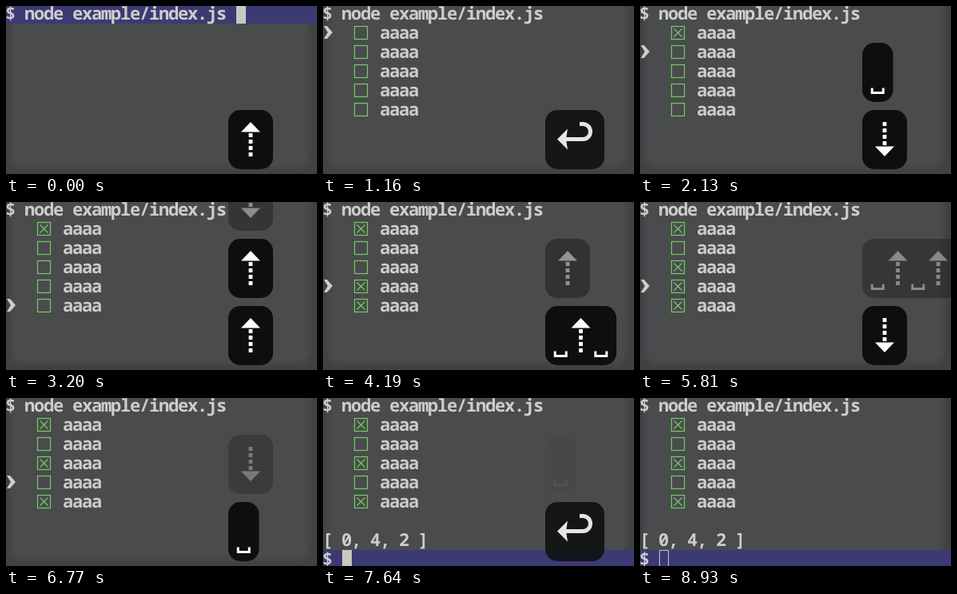
An HTML page for the animation above (9.03 s loop, 389x210 px).

```html
<!DOCTYPE html>
<html lang="en">
<head>
<meta charset="utf-8">
<title>Terminal checkbox list</title>
<style>
html, body { margin: 0; width: 100%; height: 100%; overflow: hidden; background: #404143; }
svg { display: block; width: 389px; height: 210px; }
text {
  font: 700 22px "Noto Sans Mono", "DejaVu Sans Mono", monospace;
  letter-spacing: -1.2px; fill: #cecdca; white-space: pre;
  text-rendering: geometricPrecision;
}
.box { fill: none; stroke: #74cc62; stroke-width: 1.2; }
.line { fill: none; stroke: #fff; }
</style>
</head>
<body>
<svg viewBox="0 0 389 210">
  <defs>
    <filter id="soft"><feGaussianBlur stdDeviation="3"/></filter>
    <g id="u">
      <path d="M0-21.5 12-9H-12Z" fill="#fff"/>
      <path class="line" d="M0 21.5V-9" stroke-width="4.8" stroke-dasharray="5 3"/>
    </g>
    <use id="d" href="#u" transform="scale(1 -1)"/>
    <path id="s" class="line" d="M-7 20V26H7V20" stroke-width="3"/>
    <g id="r" class="line" stroke-width="5">
      <path d="M-15 0H10A9.5 9.5 0 0 0 10-19H6"/>
      <path d="M-9-13-22 0-9 13-11 0Z" fill="#fff" stroke="none"/>
    </g>
  </defs>
  <rect x="6" y="-30" width="374" height="232" rx="14" fill="#4a4b4d" filter="url(#soft)"/>
  <g id="cursor">
    <rect id="guide" y="-2" width="389" height="24" fill="#3c3a73"/>
    <rect id="block" y="-2" width="12" height="24" fill="#c9c8c4"/>
    <rect id="hollow" x="24.5" y="-1.5" width="11" height="23" fill="none" stroke="#c9c8c4"/>
  </g>
  <text x="-1" y="17">$ node example/index.js</text>
  <g id="list"><path id="pointer" d="M1 25H5L12 33 5 41H1L6 33Z" fill="#cecdca"/></g>
  <g id="result"><text x="-1" y="185">[ 0, 4, 2 ]</text><text x="-1" y="209">$</text></g>
  <g id="keys"></g>
</svg>
<script>
const LOOP = 9030, ROW = 24, HOLD = 610, FADE = 720;
const LIST_AT = 630, DONE_AT = 7020, BLUR_AT = 8930;
const $ = id => document.getElementById(id);
const show = (el, on) => el.setAttribute("visibility", on ? "inherit" : "hidden");
function add(parent, tag, attrs) {
  const el = document.createElementNS("http://www.w3.org/2000/svg", tag);
  for (const k in attrs) el.setAttribute(k, attrs[k]);
  return parent.appendChild(el);
}

// Key presses by bubble: [time, glyph]; u = up, d = down, s = space, r = return
const WIDTH = { u: 34, d: 34, s: 16.5, r: 52 }, PAD = 11;
const bubbles = [
  [[-270, "u"]], [[450, "r"]], [[1860, "s"]], [[2130, "d"]], [[2850, "u"]], [[3150, "u"]],
  [[3650, "s"], [3920, "u"], [4100, "s"], [4460, "u"], [4730, "s"]],
  [[5630, "d"]], [[6340, "s"]], [[6930, "r"]]
].map(presses => {
  const g = add($("keys"), "g", {});
  const rect = add(g, "rect", { height: 74, rx: 15, fill: "#0d0f0f" });
  let x = PAD;
  const keys = presses.map(([at, key]) => {
    const w = WIDTH[key];
    const el = add(g, "use", { href: "#" + key, x: x + w / 2, y: 36.5 });
    x += w;
    return { at, el, right: x + PAD };
  });
  return { g, rect, keys };
});

const moves = [[0, 0], [2130, 1], [2850, 0], [3150, 4], [3920, 3], [4460, 2], [5630, 3]];
const toggles = [[1860, 0], [3650, 4], [4100, 3], [4730, 2], [6340, 3]];
const crosses = [0, 1, 2, 3, 4].map(i => {
  const g = add($("list"), "g", { transform: `translate(0 ${i * ROW})` });
  add(g, "rect", { class: "box", x: 39.5, y: 25.5, width: 16, height: 16 });
  add(g, "text", { x: 71, y: 41 }).textContent = "aaaa";
  return add(g, "path", { class: "box", d: "M42.5 28.5 52.5 38.5M52.5 28.5 42.5 38.5" });
});

function drawCursor(t) {
  const done = t >= DONE_AT, typed = t < 450;
  show($("cursor"), t < LIST_AT || done);
  $("cursor").setAttribute("transform", `translate(0 ${(done ? 8 : typed ? 0 : 1) * ROW})`);
  $("block").setAttribute("x", done ? 24 : typed ? 288 : 0);
  show($("block"), t < BLUR_AT);
  show($("hollow"), t >= BLUR_AT);
}

function drawList(t) {
  show($("list"), t >= LIST_AT);
  show($("result"), t >= DONE_AT);
  show($("pointer"), t >= LIST_AT && t < DONE_AT);
  const row = moves.filter(m => m[0] <= t).pop()[1];
  $("pointer").setAttribute("transform", `translate(0 ${row * ROW})`);
  crosses.forEach((el, i) =>
    show(el, t >= LIST_AT && toggles.filter(([at, r]) => r === i && at <= t).length % 2));
}

function drawKeys(t) {
  const begun = bubbles.filter(b => b.keys[0].at <= t).length;
  bubbles.forEach(({ g, rect, keys }, i) => {
    show(g, i < begun);
    if (i >= begun) return;
    const last = keys.filter(k => k.at <= t).pop();
    const alpha = 1 - (t - last.at - HOLD) / FADE;
    g.setAttribute("opacity", Math.max(0, Math.min(1, alpha)));
    g.setAttribute("transform", `translate(278 ${130 - 84 * (begun - 1 - i)})`);
    rect.setAttribute("width", last.right);
    keys.forEach(k => show(k.el, k.at <= t));
  });
}

const start = performance.now();
function frame() {
  const t = (performance.now() - start) % LOOP;
  drawCursor(t);
  drawList(t);
  drawKeys(t);
  requestAnimationFrame(frame);
}
frame();
</script>
</body>
</html>
```
